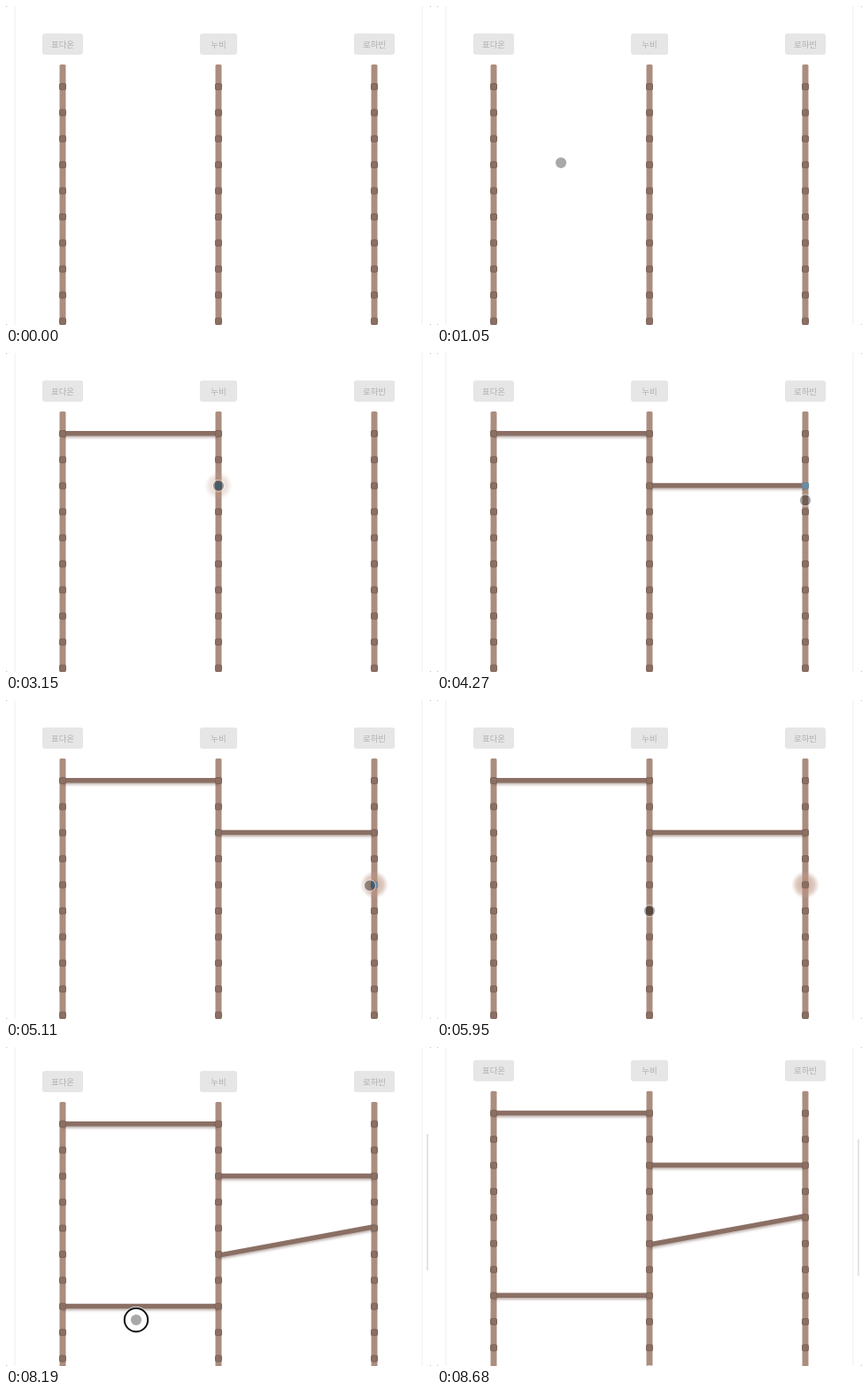
An HTML page with a canvas that plays this animation: 480x360 px, repeating every 8.75 s.

```html
<!DOCTYPE html>
<html lang="ko">
<head>
<meta charset="utf-8">
<title>사다리 타기</title>
<style>
html, body { margin: 0; width: 100%; height: 100%; overflow: hidden; background: #b4b4b4; }
canvas { display: block; width: 480px; height: 360px; border-radius: 3px; background: #fff; }
</style>
</head>
<body>
<canvas id="stage"></canvas>
<script>
const LOOP = 8750, STEP = 70, LAG = 180, FADE = 140, SCROLL_AT = 8027;
const canvas = document.getElementById('stage');
const ratio = window.devicePixelRatio || 1;
canvas.width = 480 * ratio;
canvas.height = 360 * ratio;
const c = canvas.getContext('2d');

const names = ['표다온', '누비', '로하빈'];
const poleX = i => 64 + 176 * i;
const knotY = row => 91 + 29.4 * row;
const knot = ([i, row]) => ({ x: poleX(i), y: knotY(row) });

// a beam joins two knots [pole, row]: the first is picked, then the second
const beams = [
  { from: [0, 0], to: [1, 0], pick: 1280, join: 2420 },
  { from: [1, 2], to: [2, 2], pick: 3080, join: 4040 },
  { from: [2, 4], to: [1, 5], pick: 4800, join: 6060 },
  { from: [1, 7], to: [0, 7], pick: 6860, join: 7580 }
];

// places where the cursor rests, each from arrive to leave
const rest = (p, arrive, leave = arrive) => ({ ...p, arrive, leave });
const rests = [
  rest({ x: 242, y: 392 }, 0),
  rest({ x: 225, y: 273 }, 910),
  ...beams.flatMap(b => [
    rest(knot(b.from), b.pick - 100, b.pick + 220),
    rest(knot(b.to), b.join - 150, b.join)
  ]),
  rest({ x: 76, y: 335 }, 7700, 7840),
  rest({ x: 147, y: 308 }, 8190),
  rest({ x: 242, y: 374 }, 8680)
];

const clamp = v => Math.max(0, Math.min(1, v));
const ease = u => u * u * (3 - 2 * u);

function cursorAt(t) {
  const next = rests.findIndex(r => r.arrive > t);
  if (next < 0) return rests[rests.length - 1];
  const a = rests[Math.max(0, next - 1)], b = rests[next];
  const u = ease(clamp((t - a.leave) / (b.arrive - a.leave)));
  return { x: a.x + (b.x - a.x) * u, y: a.y + (b.y - a.y) * u };
}

function box(x, y, w, h, r, fill, stroke) {
  c.beginPath();
  c.roundRect(x, y, w, h, r);
  c.fillStyle = fill;
  c.fill();
  if (stroke) {
    c.strokeStyle = stroke;
    c.lineWidth = 1;
    c.stroke();
  }
}

function disc(x, y, r, fill) {
  c.beginPath();
  c.arc(x, y, r, 0, 7);
  c.fillStyle = fill;
  c.fill();
}

function ring(x, y, r, color, width) {
  c.beginPath();
  c.arc(x, y, r, 0, 7);
  c.strokeStyle = color;
  c.lineWidth = width;
  c.stroke();
}

function drawLabels() {
  c.font = '500 9.5px "Noto Sans CJK KR", "Noto Sans CJK", sans-serif';
  c.textAlign = 'center';
  c.textBaseline = 'middle';
  names.forEach((name, i) => {
    const w = name.length > 2 ? 46 : 42;
    box(poleX(i) - w / 2, 31, w, 24, 3, '#e6e6e6');
    c.fillStyle = '#b0b0b0';
    c.fillText(name, poleX(i), 43);
  });
}

function drawBeam({ from, to, join }, t) {
  const a = knot(from), b = knot(to);
  const tilt = Math.sign(a.y - b.y) * 1.5;
  c.save();
  c.globalAlpha = clamp((t - join + STEP) / FADE);
  c.shadowColor = 'rgba(90,60,50,.4)';
  c.shadowBlur = 3 * ratio;
  c.shadowOffsetY = 2 * ratio;
  c.strokeStyle = '#8b6f64';
  c.lineWidth = 5.5;
  c.beginPath();
  c.moveTo(a.x, a.y + tilt - 0.3);
  c.lineTo(b.x, b.y - tilt - 0.3);
  c.stroke();
  c.restore();
}

function drawGlow({ from, pick, join }, t) {
  const { x, y } = knot(from);
  const g = c.createRadialGradient(x, y, 3, x, y, 16);
  g.addColorStop(0, 'rgba(184,140,120,.65)');
  g.addColorStop(.55, 'rgba(190,150,132,.5)');
  g.addColorStop(1, 'rgba(200,165,150,0)');
  c.globalAlpha = clamp((t - pick) / FADE) * clamp((join + FADE - t) / FADE);
  disc(x, y, 16, g);
  c.globalAlpha = 1;
}

function drawKnots(x, t) {
  const hover = cursorAt(t - LAG);
  for (let row = 0; row < 10; row++) {
    const y = knotY(row);
    const hot = Math.hypot(hover.x - x, hover.y - y) < 6;
    box(x - 3.5, y - 3.5, 7, 7, 1.5,
      hot ? '#6b8ca2' : '#8b6f63', hot ? '#68869a' : '#7d6459');
  }
}

function drawCursor(t) {
  const { x, y } = cursorAt(t);
  if (t > SCROLL_AT) {
    disc(x, y, 15, '#fff');
    ring(x, y, 13.2, '#111', 2);
  }
  disc(x, y, 6.2, 'rgba(0,0,0,.34)');
  ring(x, y, 6.5, 'rgba(255,255,255,.6)', 1);
}

function draw(t) {
  const scroll = Math.max(0, t - SCROLL_AT) * 0.0248;
  c.setTransform(ratio, 0, 0, ratio, 0, 0);
  c.fillStyle = '#fff';
  c.fillRect(0, 0, 480, 360);
  c.fillStyle = '#f0f0f0';
  c.fillRect(9.5, 0, 1, 360);
  c.fillRect(469.5, 0, 1, 360);

  c.save();
  c.translate(0, -scroll);
  drawLabels();
  names.forEach((_, i) => box(poleX(i) - 3.5, 66, 7, 340, 1.5, '#ab8d7e'));
  beams.forEach(b => drawBeam(b, t));
  beams.forEach(b => drawGlow(b, t));
  names.forEach((_, i) => drawKnots(poleX(i), t));
  c.restore();

  c.globalAlpha = clamp(scroll / 2);
  box(475, 96 + scroll / 2, 2, 154.5, 1, '#e4e4e4');
  c.globalAlpha = 1;
  drawCursor(t);
}

function tick() {
  const t = performance.now() % LOOP;
  draw(Math.floor(t / STEP) * STEP);
  requestAnimationFrame(tick);
}
tick();
</script>
</body>
</html>
```
